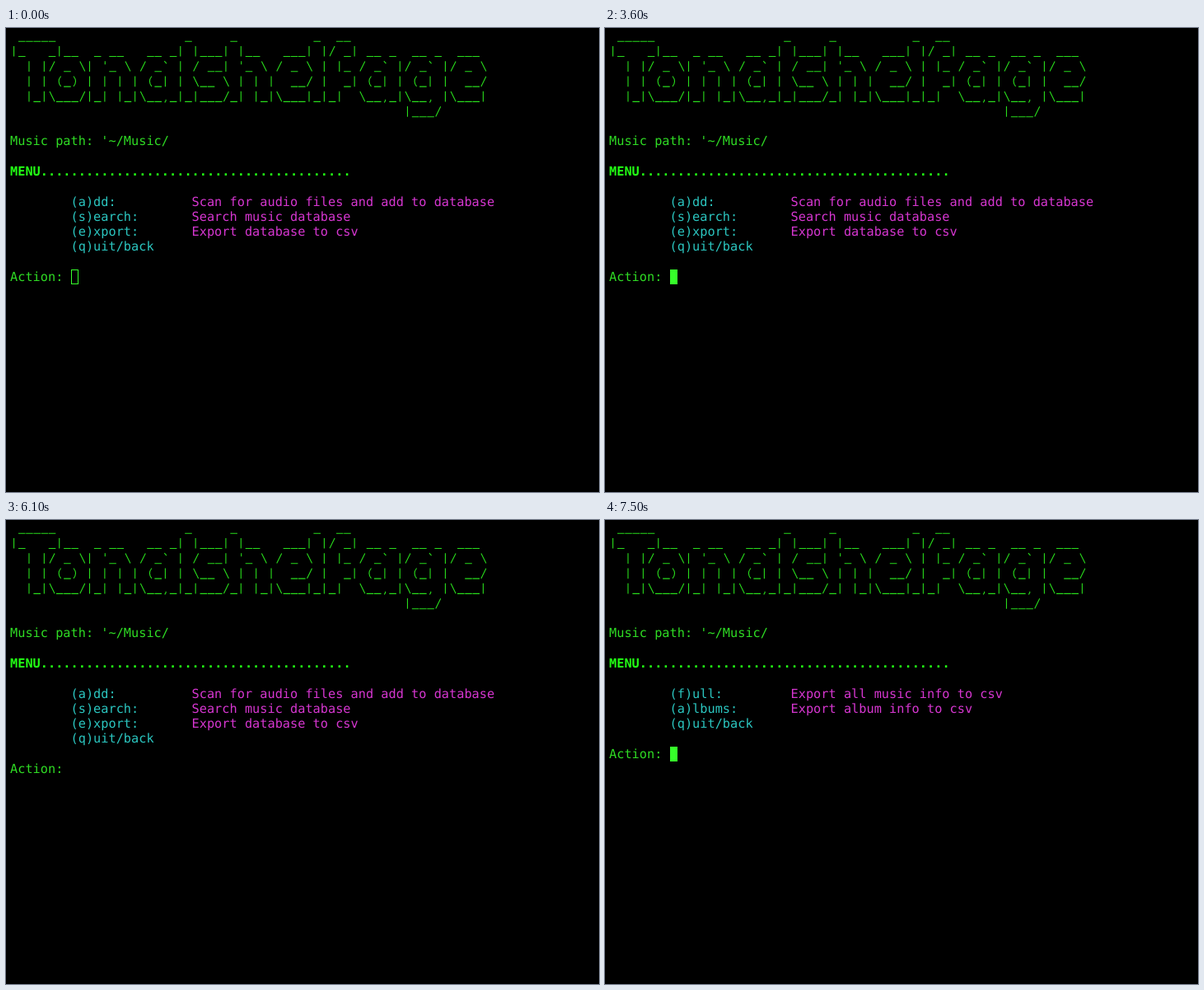
An HTML page for the animation above (8000 ms loop, 720x563 px).

```html
<!DOCTYPE html>
<html lang="en">
<head>
<meta charset="utf-8">
<title>Terminal menu</title>
<style>
  html, body { margin: 0; width: 100%; height: 100%; overflow: hidden; background: #000; }
  svg { display: block; width: 720px; height: 563px; }
  text {
    font: 15.27px "DejaVu Sans Mono", "Liberation Mono", monospace;
    text-rendering: geometricPrecision;
    white-space: pre;
    fill: #2fdc24;
  }
  .bold { font-weight: bold; fill: #22ff14; }
  .key { fill: #2bc6c0; }
  .info { fill: #d636d0; }
  #banner { fill: none; stroke: #29dc1c; stroke-width: 1.1; }
  #cursor { stroke: #36ff2a; }
</style>
</head>
<body>
<svg id="screen" viewBox="0 0 720 563">
  <path id="banner" role="img" aria-label="Tonalshelfage"/>
  <g id="header"></g>
  <g id="main"></g>
  <g id="export"></g>
  <rect id="cursor" width="8" height="17"/>
</svg>
<script>
const LOOP = 8000;
const LEFT = 5.5, COL = 9.19, ROW = 18.3, TOP = 0.6, BASE = 14.2;
const $ = id => document.getElementById(id);

const banner = String.raw`
 _____                 _     _          _  __
|_   _|__  _ __   __ _| |___| |__   ___| |/ _| __ _  __ _  ___
  | |/ _ \| '_ \ / _~ | / __| '_ \ / _ \ | |_ / _~ |/ _~ |/ _ \
  | | (_) | | | | (_| | \__ \ | | |  __/ |  _| (_| | (_| |  __/
  |_|\___/|_| |_|\__,_|_|___/_| |_|\___|_|_|  \__,_|\__, |\___|
                                                    |___/`.split("\n").slice(1);

// Pen strokes inside one character cell; "~" stands for a backtick.
const strokes = {
  "|": "m4.1 3v12.7",
  "_": "m.3 15.6h8.6",
  "/": "m7.6 3.2l-6 12.2",
  "\\": "m1.6 3.2l6 12.2",
  "(": "m6 3q-5 6.2 0 12.4",
  ")": "m3 3q5 6.2 0 12.4",
  "'": "m4.5 3v4",
  "~": "m3 3l2.6 3",
  ",": "m4.8 13v1.6l-1.4 2"
};

$("banner").setAttribute("d", banner.flatMap((line, r) =>
  [...line].map((ch, c) => strokes[ch]
    ? `M${(LEFT + c * COL).toFixed(2)} ${(TOP + r * ROW).toFixed(2)}${strokes[ch]}`
    : "")).join(""));

function write(parent, row, col, string, style = "") {
  const el = document.createElementNS("http://www.w3.org/2000/svg", "text");
  el.setAttribute("x", LEFT - 0.5 + col * COL);
  el.setAttribute("y", BASE + row * ROW);
  el.setAttribute("class", style);
  el.textContent = string;
  parent.append(el);
  return el;
}

function menu(parent, items) {
  items.forEach(([key, info], i) => {
    write(parent, 11 + i, 8, key, "key");
    if (info) write(parent, 11 + i, 24, info, "info");
  });
  write(parent, 12 + items.length, 0, "Action:");
}

write($("header"), 7, 0, "Music path: '~/Music/");
write($("header"), 9, 0, "MENU" + ".".repeat(41), "bold");
menu($("main"), [
  ["(a)dd:", "Scan for audio files and add to database"],
  ["(s)earch:", "Search music database"],
  ["(e)xport:", "Export database to csv"],
  ["(q)uit/back"]
]);
menu($("export"), [
  ["(f)ull:", "Export all music info to csv"],
  ["(a)lbums:", "Export album info to csv"],
  ["(q)uit/back"]
]);
const typed = write($("main"), 16, 8, "e");

// start, cursor look, cursor row, cursor column, key typed, export menu open
const steps = [
  [0, "hollow", 16, 8],
  [1500, "solid", 16, 8],
  [2100, "off", 16, 8],
  [2700, "solid", 16, 8],
  [3100, "off", 16, 8],
  [3600, "solid", 16, 8],
  [4200, "off", 16, 8],
  [4700, "solid", 16, 8],
  [5200, "off", 16, 8],
  [5700, "solid", 16, 8],
  [6100, "off", 16, 8],
  [6700, "solid", 16, 8],
  [6800, "solid", 16, 9, true],
  [7000, "solid", 17, 0, true],
  [7100, "solid", 15, 8, true, true]
];

const show = (el, on) => el.setAttribute("visibility", on ? "visible" : "hidden");

function draw(t) {
  const [, look, row, col, key, exporting] = steps.findLast(s => s[0] <= t);
  const cursor = $("cursor");
  show($("main"), !exporting);
  show($("export"), exporting);
  show(typed, key && !exporting);
  show(cursor, look !== "off");
  cursor.setAttribute("x", Math.round(LEFT + col * COL) + 0.5);
  cursor.setAttribute("y", Math.round(TOP + row * ROW) + 0.5);
  cursor.setAttribute("fill", look === "solid" ? "#36ff2a" : "none");
}

const start = performance.now();
function tick() {
  draw((performance.now() - start) % LOOP);
  requestAnimationFrame(tick);
}
tick();
</script>
</body>
</html>
```
